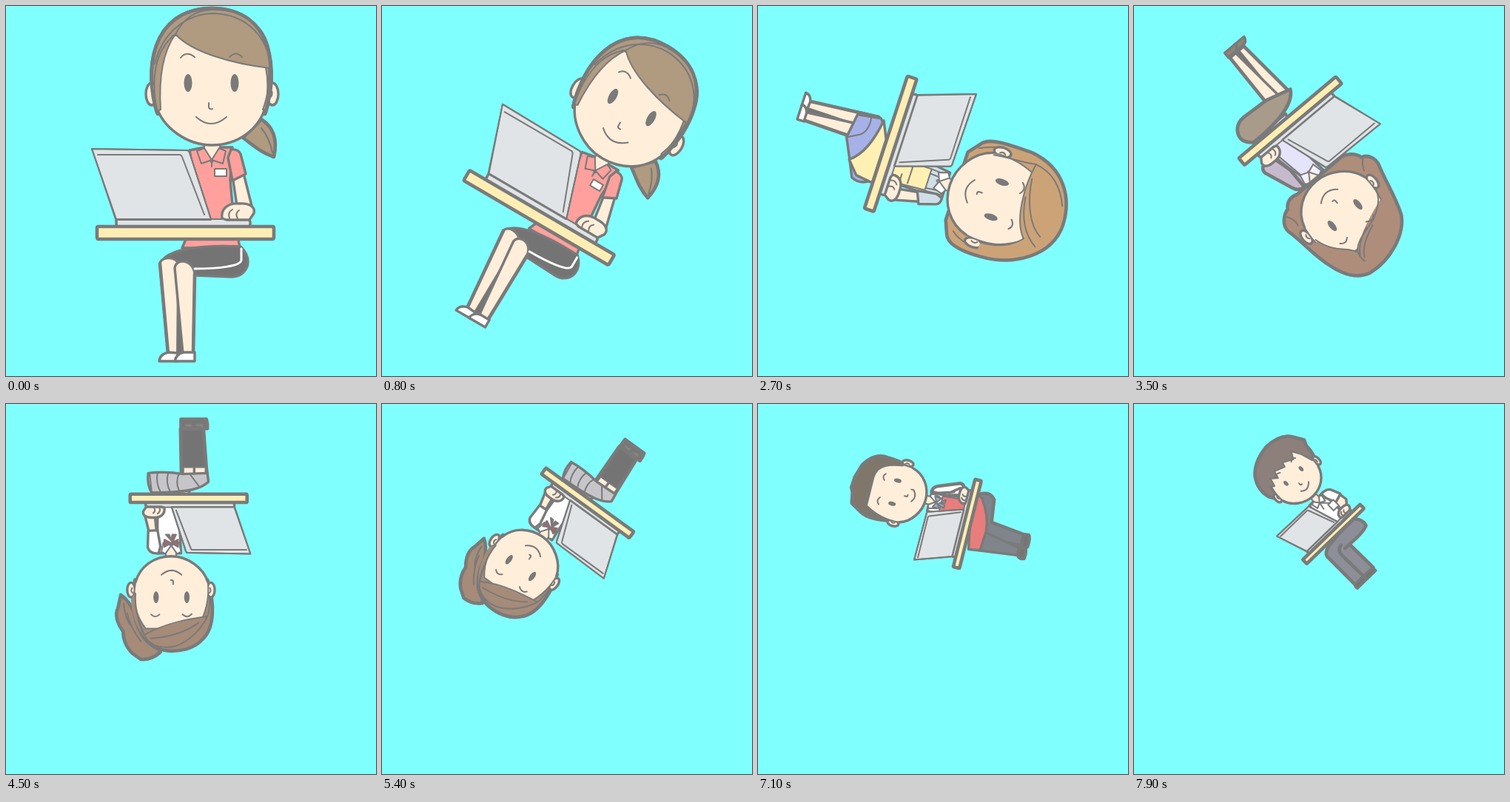
Recreate the animation shown at these times as an HTML page with a canvas. Size 500 by 500 pixels, loop 8 s.

```html
<!DOCTYPE html>
<html lang="en">
<head>
<meta charset="utf-8">
<title>Spinning desk workers</title>
<style>
html, body { margin: 0; width: 100%; height: 100%; overflow: hidden; background: #80ffff; }
canvas { display: block; }
</style>
</head>
<body>
<canvas id="stage" width="500" height="500"></canvas>
<script>
const ctx = document.getElementById('stage').getContext('2d');
const LINE = '#7a7a7a', SKIN = '#ffeeda', GREY = '#e0e4e6', DARK = '#747474', WHITE = '#fff';
const THICK = 4.6, MID = 3.4, THIN = 2;
const STEP = 100, STEPS = 80, PER_PERSON = 15;
let scale = 1;

// Line widths stay constant on screen while the figure shrinks.
function pen(d, fill, width = THICK) {
  const path = new Path2D(d);
  if (fill) { ctx.fillStyle = fill; ctx.fill(path); }
  if (width) { ctx.lineWidth = width / scale; ctx.stroke(path); }
}
const line = (d, width = THIN) => pen(d, null, width);

function oval(x, y, rx, ry, fill, width = 0) {
  const path = new Path2D();
  path.ellipse(x, y, rx, ry, 0, 0, 7);
  ctx.fillStyle = fill;
  ctx.fill(path);
  if (width) { ctx.lineWidth = width / scale; ctx.stroke(path); }
}

function shifted(dx, dy, draw) {
  ctx.save();
  ctx.translate(dx, dy);
  draw();
  ctx.restore();
}

function ears() {
  for (const [x, side] of [[197, 1], [360, -1]]) {
    oval(x, 119, 8, 15, SKIN, MID);
    line(`M${x + 3 * side} 113q${-5 * side} 4 ${-side} 10`);
  }
}

function skull() {
  pen('M203 135C212 165 245 188 278 188C312 188 342 168 351 135C357 100 353 70 330 40L225 40C204 75 200 105 203 135Z', SKIN, THIN);
  line('M203 135C212 165 245 188 278 188C312 188 342 168 351 135', MID);
}

function features(eyeH = 12, mouth = 'M257 150Q277 168 298 150') {
  oval(246, 104, 5.5, eyeH, LINE);
  oval(309, 104, 5.5, eyeH, LINE);
  line('M236 70Q244 60 255 69M302 69Q311 60 319 69');
  line('M274 131V137Q275 140 279 139');
  line(mouth);
}

function neck() {
  pen('M268 184V198L278 212L289 198V184Z', SKIN, THIN);
}

function legs() {
  pen('M208 350C207 337 232 338 234 350L246 364L242 470L219 470Z', SKIN, MID);
  pen('M232 370L231 468L238 468Z', DARK, THIN);
  pen('M228 354C230 340 253 342 255 362L253 470L239 470Z', SKIN, MID);
  line('M208 348L219 470M255 362L253 470', THICK);
}

function shoes(fill, dy = 0) {
  pen(`M207 ${480 + dy}Q208 ${470 + dy} 220 ${468 + dy}L232 ${469 + dy}V${480 + dy}Z`, fill, MID);
  pen(`M228 ${480 + dy}Q230 ${470 + dy} 240 ${468 + dy}L255 ${468 + dy}V${480 + dy}Z`, fill, MID);
}

function bareArm(shade, sleeveEnd = 'L324 227L306 236') {
  pen('M306 230L321 226L333 274L313 276Z', SKIN, MID);
  pen('M304 194Q314 193 317 200' + sleeveEnd + 'L300 205Z', shade, MID);
}

function longArm(shade) {
  pen('M302 194Q316 194 321 208L342 262Q343 276 326 275L312 273L302 236Z', shade, THICK);
}

function desk() {
  pen('M149 288H328Q332 292 328 298H150Z', GREY, THIN);
  line('M149 290V298M328 289Q332 292 329 298', MID);
  line('M149 289H277', THIN);
  pen('M116 193L244 195Q247 195 248 198L277 288H149Z', GREY, THIN);
  line('M149 291L116 193L244 195Q247 195 248 198L277 288');
  line('M124 201H234Q237 201 238 204L268 282');
  pen('M125 298H360Q362 298 362 300V312Q362 315 360 315H125Q123 315 123 312V300Q123 298 125 298Z', '#ffeeb4');
  pen('M292 287C290 274 300 266 315 267C330 266 337 272 335 280L329 289H298Z', SKIN, MID);
  line('M302 287Q299 279 306 275M313 287Q309 280 315 276');
}

function line2(d) { line(d, THICK); }

function poloWoman() {
  const hair = '#b09a80', pink = '#ffa09c';
  pen('M320 178L345 153C362 164 367 182 362 204C344 198 334 188 320 178Z', hair);
  line('M345 165Q356 178 360 198');
  pen('M248 195L268 191H306L303 235L306 270L316 327H238L262 270Z', pink, MID);
  bareArm(pink);
  pen('M212 343C222 330 260 322 317 325Q330 338 326 352Q320 366 304 366L256 364Z', DARK, MID);
  legs();
  shoes(WHITE);
  ctx.strokeStyle = WHITE;
  line('M255 355C285 355 318 352 318 343V328', 3);
  ctx.strokeStyle = LINE;
  neck();
  pen('M268 192L278 208L264 213L258 196ZM288 192L278 208L293 213L297 196Z', pink, THIN);
  line('M278 208V217');
  pen('M282 220H298V230H282Z', WHITE, THIN);
  pen('M205 146C186 90 194 4 278 3C364 4 368 90 350 146Z', hair);
  ears();
  skull();
  pen('M229 38C212 62 206 95 209 140L204 142C196 100 200 60 229 38Z', hair, THIN);
  pen('M355 82C356 105 353 125 347 140L352 140C359 120 362 100 358 80Z', hair, THIN);
  pen('M229 38C250 62 305 78 357 84C361 30 325 4 278 5C255 6 240 17 229 38Z', hair, THIN);
  line('M201 78C212 34 245 10 282 10C328 12 354 45 357 80');
  line2('M204 144C187 90 194 4 278 3C364 4 366 90 351 144');
  features();
}

function apronWoman() {
  const hair = '#cca377', yellow = '#fff0b4', blue = '#a6b1e8', shirt = '#cfdfe8';
  pen('M258 194H306L304 320H240Z', shirt, MID);
  bareArm(shirt, 'L326 229L305 238');
  pen('M262 226H300L306 320H240L262 270Z', yellow, THIN);
  line('M262 226L264 195M270 226L272 195M296 226L293 195M301 226L299 195M262 258H298M286 272H302V290');
  shifted(-3, -8, () => {
    legs();
    shoes(WHITE);
  });
  pen('M206 336C214 325 245 318 312 318Q326 334 318 352L288 366L255 382L212 376Z', blue, MID);
  line('M209 352Q234 348 244 362L255 382');
  pen('M208 330L238 316H316L312 346L290 366C278 350 254 336 208 330Z', yellow, MID);
  neck();
  pen('M267 192L278 207L264 213L259 197ZM289 192L278 207L292 213L297 197Z', WHITE, THIN);
  pen('M196 160C178 150 181 105 182 70C190 10 235 -18 285 -18C340 -16 377 40 379 100C381 140 374 162 360 167L338 176H215Z', hair);
  ears();
  skull();
  pen('M199 58C240 66 300 64 327 39C345 55 354 75 356 108L372 108C373 35 330 -13 285 -15C240 -14 205 15 199 58Z', hair, 0);
  line('M356 108C354 75 345 55 327 39C300 64 240 66 199 58C203 25 225 5 253 -7');
  line('M225 57C263 53 302 37 315 13M258 58C290 54 318 42 334 16M199 58C203 85 202 105 206 132');
  line('M191 128Q196 148 203 160M365 128Q362 146 352 158');
  features();
}

function suitWoman() {
  const hair = '#af8d7b', mauve = '#c8bacd', brown = '#a89b89';
  pen('M254 194H304L306 322H240L262 270Z', '#e6e4fa', MID);
  pen('M289 194L306 194L306 322H292L302 270Z', mauve, THIN);
  longArm(mauve);
  line('M290 196L300 236L306 264');
  legs();
  shoes('#918474', 4);
  line('M211 474H231M232 474H252');
  pen('M204 352C212 336 240 318 322 320Q340 334 334 350Q326 368 306 368L252 365Z', brown);
  neck();
  pen('M267 193L278 210L262 216L258 197ZM289 193L278 210L294 216L298 197Z', '#f3f1ff', THIN);
  pen('M224 192C200 196 186 178 184 168C170 164 164 148 168 135C178 105 182 70 196 36C215 4 265 -16 310 -10C336 -4 352 20 360 48C372 84 370 112 379 148C382 168 362 180 353 182C345 195 332 196 322 192Z', hair);
  ears();
  skull();
  pen('M207 84C240 72 274 62 304 35C314 58 334 62 349 100L358 98C360 40 326 0 285 -4C235 -2 204 32 207 84Z', hair, 0);
  line('M201 108C204 86 222 74 241 64C268 55 294 52 304 35C314 58 338 60 350 104');
  line('M250 56C275 46 292 36 300 20M262 60C282 52 296 42 304 28M304 35Q307 24 305 14');
  line('M181 166Q193 156 196 145M364 172Q355 160 358 146');
  features();
}

function pleatWoman() {
  const hair = '#a58b78', skirt = '#c6c6ca';
  pen('M258 194H306L306 322H240L262 270Z', WHITE, MID);
  pen('M308 238L323 236L333 276H312Z', SKIN, MID);
  pen('M304 194Q322 192 326 206L325 240L306 241L300 208Z', WHITE, MID);
  pen('M204 345H257L259 448H212L207 380Z', DARK);
  pen('M208 350H253V370H208Z', SKIN, THIN);
  line('M231 350V370', MID);
  pen('M204 449H258V468H206Q203 458 204 449Z', '#777');
  pen('M210 452Q228 450 230 458L214 460ZM234 452Q252 450 253 458L236 460Z', '#8b8681', THIN);
  pen('M202 340C215 328 236 318 318 318Q328 334 325 358C300 361 280 360 254 356L204 358Z', skirt, MID);
  line('M318 320L322 356M300 320Q310 338 306 360M280 320Q290 338 284 359M262 322Q270 340 262 357M222 332L240 356');
  neck();
  pen('M266 193L278 210L262 216L258 197ZM290 193L278 210L294 216L298 197Z', WHITE, THIN);
  pen('M278 215L264 207V222ZM278 215L292 207V222ZM275 217L268 232H276L278 220L282 232H289Z', '#b0606c', THIN);
  pen('M381 109C368 101 360 88 352 70L300 -8C312 -19 324 -24 340 -23L358 -10C372 4 377 22 376 34C390 52 393 70 387 82Z', hair);
  line('M340 14Q363 44 368 72M362 48Q374 66 375 92');
  pen('M204 140C188 90 190 40 214 18C232 -2 262 -8 288 -5C340 2 366 62 352 140Z', hair);
  ears();
  skull();
  pen('M204 66C240 58 290 50 333 27C350 58 354 82 352 112L360 100C358 40 326 0 280 -2C240 -2 208 26 204 66Z', hair, 0);
  line('M199 103C200 85 200 72 204 65C240 60 290 52 333 27C346 56 353 82 351 112');
  line('M333 27C322 4 296 -2 270 4C240 14 216 40 204 65M320 20C285 22 250 32 222 52M333 27Q343 42 347 70');
  features();
}

function apronMan() {
  const hair = '#81766a', red = '#e87d7b', slacks = '#80858b';
  pen('M250 195H306L306 322H240Z', WHITE, MID);
  pen('M256 226H298L306 322H240L262 270Z', red, THIN);
  longArm(WHITE);
  line('M304 214L316 252M310 240L330 266', MID);
  pen('M228 336L326 318Q342 345 322 360L262 368L251 462H221L217 365Z', slacks);
  pen('M182 338L236 340L213 458H194L182 356Z', slacks, MID);
  pen('M219 460L251 458L253 472Q246 478 222 476Q214 470 219 460Z', DARK);
  pen('M194 456L215 456L217 472Q206 477 190 475Q184 464 194 456Z', DARK);
  pen('M178 326L240 314H326L318 328C292 346 262 358 235 360L182 356Z', red, MID);
  neck();
  pen('M266 193L278 210L262 218L258 197ZM290 193L278 210L294 218L298 197Z', WHITE, THIN);
  pen('M278 214L264 206V224ZM278 214L292 206V224ZM274 217L268 236H276L278 222L282 236H290Z', '#91b8dc', THIN);
  shifted(0, -4, () => {
    pen('M203 118C194 80 192 50 205 28L222 0L250 -5L262 -11L290 -9L326 2C352 18 366 40 362 62Q362 95 353 118Z', hair);
    ears();
    skull();
    pen('M204 92C206 70 212 46 230 32C262 38 296 32 324 46C342 60 347 82 351 106L360 80C358 30 324 4 280 0C238 2 200 42 204 92Z', hair, 0);
    line('M202 105C206 72 212 48 230 32C262 38 296 32 324 46C342 60 347 82 351 108');
    line('M203 66L212 46M355 68L345 48');
    features(10, 'M264 152Q279 165 295 151V145');
  });
}

function tagMan() {
  const hair = '#8d7f79', slacks = '#8e8e98';
  pen('M250 195H306L308 322H240Z', WHITE, MID);
  pen('M312 226L338 226L343 258L328 276L311 272Z', SKIN, MID);
  pen('M300 195Q322 193 330 206L342 234L314 243L302 214Z', WHITE, MID);
  pen('M292 232H314V256H292Z', WHITE, THIN);
  pen('M182 342C184 326 205 316 318 316Q338 336 331 356Q312 366 256 362L259 462H184Z', slacks);
  line2('M220 464L217 370Q216 350 236 346M254 362H238');
  pen('M184 460H219V474H181Q178 466 184 460ZM222 460H258V474H221Z', DARK, MID);
  neck();
  pen('M266 195L278 210L262 218L258 199ZM290 195L278 210L294 218L298 199Z', WHITE, THIN);
  line('M278 210L300 232M278 210L274 232');
  shifted(0, -6, () => {
    pen('M199 128L182 100C172 70 180 44 194 24C214 0 244 -12 280 -16C322 -15 348 -2 360 22L376 48L368 66Q369 94 356 120Z', hair);
    ears();
    skull();
    pen('M201 110L204 80L216 86L222 62L240 76L246 54L278 66L282 52L312 68L324 46L340 74L348 104L360 80C356 24 320 -6 280 -8C236 -8 194 30 201 110Z', hair, 0);
    line('M201 116L204 80L216 86L222 62L240 76L246 54L278 66L282 52L312 68L324 46L340 74L350 108');
    features(9, 'M262 152Q280 168 298 148');
  });
}

// Each figure with its own offset from the turning point.
const PEOPLE = [
  [poloWoman, 0, 0], [apronWoman, 2, 22], [suitWoman, 2, 7],
  [pleatWoman, -1.5, 20.7], [apronMan, 8, 4], [tagMan, -11, 13]
];
// Step, scale, angle in degrees.
const PATH = [
  [0, 1, 0], [8, .948, 30.3], [19, .857, 76], [35, .717, 140],
  [45, .661, 180], [64, .562, 256], [79, .45, 316]
];

function poseAt(n) {
  const i = Math.max(1, PATH.findIndex(([at]) => at >= n));
  const a = PATH[i - 1], b = PATH[i];
  const part = (n - a[0]) / (b[0] - a[0]);
  return [1, 2].map(k => a[k] + (b[k] - a[k]) * part);
}

function draw(now) {
  const n = Math.floor(now / STEP) % STEPS;
  const [person, dx, dy] = PEOPLE[Math.floor(n / PER_PERSON)];
  const [size, angle] = poseAt(n);
  scale = size;
  ctx.setTransform(1, 0, 0, 1, 0, 0);
  ctx.fillStyle = '#80ffff';
  ctx.fillRect(0, 0, 500, 500);
  ctx.translate(254 - 12 * scale, 70 + 172 * scale);
  ctx.rotate(angle * Math.PI / 180);
  ctx.scale(scale, scale);
  ctx.translate(dx - 242, dy - 242);
  ctx.strokeStyle = LINE;
  ctx.lineJoin = ctx.lineCap = 'round';
  person();
  desk();
}

const start = performance.now();
function tick() {
  draw(performance.now() - start);
  requestAnimationFrame(tick);
}
tick();
</script>
</body>
</html>
```
